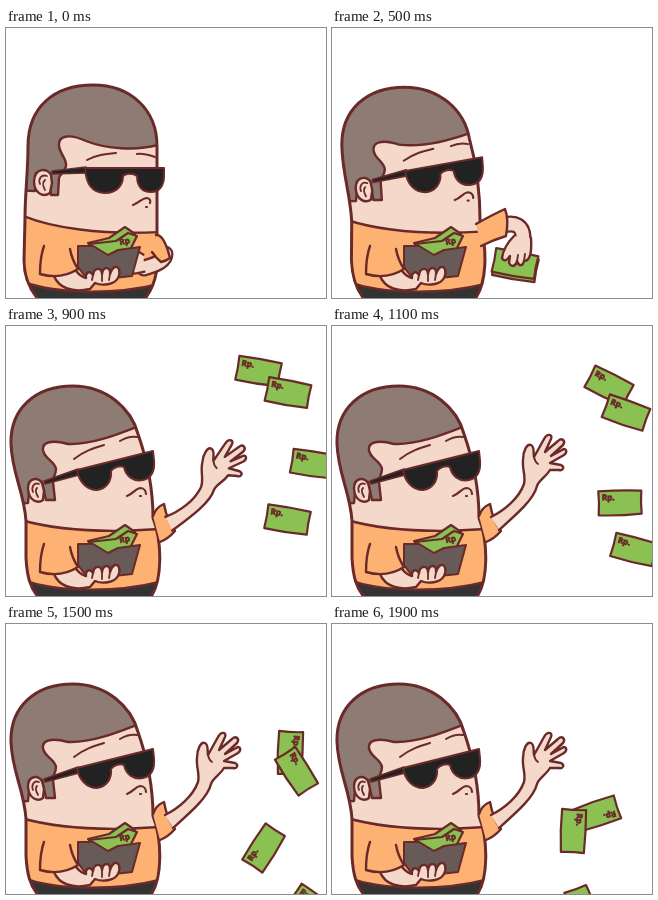
An HTML page for the animation above (2000 ms loop, 320 by 270 pixels).

```html
<!DOCTYPE html>
<html lang="en">
<head>
<meta charset="utf-8">
<title>Throwing banknotes</title>
<style>
  html, body { margin: 0; width: 100%; height: 100%; overflow: hidden; background: #fff; }
  svg { display: block; width: 100%; height: 100%; }
  path { stroke-linecap: round; stroke-linejoin: round; }
  text { font: bold 8px "Noto Sans", sans-serif; fill: #6b2a2a; stroke: #6b2a2a; stroke-width: .8; }
</style>
</head>
<body>
<svg id="stage" viewBox="0 0 320 270"></svg>
<script>
const LOOP = 2000, STEP = 100, LEAN_TIME = 700, RELEASE = 700;
const INK = '#6b2a2a', SKIN = '#f4d8ca', HAIR = '#8d7b74', SHIRT = '#fdb172';
const GREEN = '#8bc153', LEATHER = '#685a56', BLACK = '#222', PANTS = '#333';

const stage = document.getElementById('stage');

function el(tag, attrs, parent = stage) {
  const node = document.createElementNS('http://www.w3.org/2000/svg', tag);
  for (const k in attrs) node.setAttribute(k, attrs[k]);
  parent.appendChild(node);
  return node;
}
const group = (parent = stage, attrs = {}) => el('g', attrs, parent);
const shape = (parent, d, fill = 'none', width = 2.4, stroke = INK) =>
  el('path', { d, fill, stroke, 'stroke-width': width }, parent);

// Blends every number in two strings of the same structure.
const NUM = /-?\d+(?:\.\d+)?/g;
function blend(a, b, p) {
  const to = b.match(NUM);
  let i = 0;
  return a.replace(NUM, n => (+n + (to[i++] - n) * p).toFixed(2));
}

// Linear track of [time, string] keys.
function track(keys, t) {
  if (t <= keys[0][0]) return keys[0][1];
  const i = keys.findIndex(k => k[0] >= t);
  if (i < 0) return keys[keys.length - 1][1];
  const [t0, a] = keys[i - 1], [t1, b] = keys[i];
  return blend(a, b, (t - t0) / (t1 - t0));
}

// Smooth track of [time, ...values] keys.
function spline(keys, t) {
  let i = 0;
  while (i < keys.length - 2 && keys[i + 1][0] < t) i++;
  const a = keys[i], b = keys[i + 1], h = b[0] - a[0], u = (t - a[0]) / h;
  const slope = (j, c) => {
    const l = keys[Math.max(j - 1, 0)], r = keys[Math.min(j + 1, keys.length - 1)];
    return (r[c] - l[c]) / (r[0] - l[0]) * h;
  };
  return [1, 2, 3].map(c =>
    (1 + 2 * u) * (1 - u) ** 2 * a[c] + u * (1 - u) ** 2 * slope(i, c) +
    u * u * (3 - 2 * u) * b[c] + u * u * (u - 1) * slope(i + 1, c));
}

const place = (node, x, y, r) => node.setAttribute('transform', `translate(${x} ${y}) rotate(${r})`);

// Parts that follow the lean: upright path and leaning path.
const leaning = [];
function lean(node, upright, back) {
  leaning.push([node, upright, back]);
  return node;
}
const leanShape = (parent, upright, back, ...style) =>
  lean(shape(parent, upright, ...style), upright, back);

const BODY = [
  'M33 272C24 262 18 250 18 232L19 190C19 165 22 145 22 118C22 80 47 57 87 57C125 57 151 82 151 118C151 130 151 165 151 205C153 235 152 255 138 272',
  'M33 272C24 262 21 250 20 232L20 195C18 165 6 148 5 118C4 83 29 60 67 60C100 60 125 82 132 108C139 128 147 155 147 192C156 215 157 255 144 272'
];

function drawBody() {
  const clip = el('clipPath', { id: 'body' }, el('defs', {}));
  lean(el('path', {}, clip), ...BODY);
  leanShape(stage, ...BODY, SKIN, 0, 'none');
  const inner = group(stage, { 'clip-path': 'url(#body)' });
  leanShape(inner,
    'M0 162L0 40L170 40L152 117C130 123 100 121 80 113C62 105 52 108 53 118C54 126 61 131 60 138C59 144 54 146 53 150L52 167L45 167L43 145L30 145L29 163Z',
    'M0 178L0 40L170 40L133 100C110 109 85 119 62 118C44 113 36 117 37 124C38 133 49 135 50 143C50 149 46 152 47 156L49 174L40 174L36 156L24 156L22 177Z', HAIR);
  leanShape(inner, 'M15 187C45 200 95 207 155 204L175 275L5 275Z',
    'M15 194C50 204 100 207 155 203L175 275L5 275Z', SHIRT);
  shape(inner, 'M15 253C50 267 115 267 160 254L165 280L10 280Z', PANTS);
  leanShape(stage, ...BODY, 'none', 3);
}

function drawFace() {
  leanShape(stage, 'M45 147C42 140 29 139 28 153C28 165 37 170 44 165L46 155Z',
    'M36 157C32 151 22 151 22 163C23 175 32 178 37 174L38 165Z', SKIN);
  leanShape(stage, 'M41 148C35 146 32 151 34 156M39 152C35 156 38 159 39 162',
    'M33 158C28 156 25 161 27 166M31 162C28 165 31 168 32 171', 'none', 1.8);
  leanShape(stage, 'M81 132C90 127 99 126 110 125M131 126C138 125 143 127 149 129',
    'M68 133C78 125 88 122 98 119M114 115C119 112 125 110 131 111', 'none', 2);
  leanShape(stage, 'M46 143L80 139L80 145L46 146Z', 'M38 155L72 143L73 149L39 158Z', BLACK, 1.6);
  leanShape(stage,
    'M79 140L158 140L158 148C158 158 153 164 145 164C136 164 131 158 131 148C127 145 120 145 117 148C117 158 110 165 99 165C87 165 80 157 79 140Z',
    'M71 144L147 125L148 134C149 145 145 152 137 154C127 156 120 150 118 141C114 139 108 141 105 145C106 155 100 163 91 164C81 164 73 156 71 144Z', BLACK, 2);
  leanShape(stage, 'M127 177C133 175 135 171 140 170C144 170 145 173 144 175M140 179L141 179',
    'M121 170C127 168 129 163 134 162C138 162 140 165 140 168M134 170L135 170', 'none', 2.2);
}

function note(parent, label) {
  const g = group(parent);
  shape(g, 'M-21.5 -12Q0 -13 21.5 -12Q20.5 0 21.5 11Q0 13 -21.5 12Q-20.5 0 -21.5 -12Z', GREEN, 2.2);
  el('text', { x: -18, y: -3 }, g).textContent = label;
  return g;
}

// Arm that draws the notes from the wallet.
const SLEEVE = [
  [0, 'M150 207Q158 206 164 230Q160 233 155 234Q150 230 146 224'],
  [200, 'M146 205Q162 201 175 208Q168 218 158 226Q151 224 146 222'],
  [500, 'M144 196Q160 187 173 181Q177 191 174 208Q161 212 149 218'],
  [600, 'M145 193Q155 185 165 181Q167 193 171 207Q163 212 151 217'],
  [700, 'M147 190Q150 181 158 178Q161 195 169 205Q162 213 154 216']
];
const FOREARM = [
  [0, 'M159 226C159 232 152 236 138 240'],
  [200, 'M163 215C160 229 154 238 138 245'],
  [500, 'M166 199C184 192 192 198 191 213'],
  [600, 'M162 195C175 190 185 186 196 182']
];
const HAND = [
  [0, 'translate(136 236) rotate(80)'],
  [200, 'translate(140 243) rotate(65)'],
  [500, 'translate(191 211) rotate(0)'],
  [600, 'translate(196 182) rotate(-80)']
];
const HELD = [
  [0, 'translate(103 234) rotate(-5)'],
  [200, 'translate(135 241) rotate(-22)'],
  [500, 'translate(183 236) rotate(11)'],
  [600, 'translate(203 189) rotate(-50)']
];

drawBody();
drawFace();

const reach = group();
const held = group(reach);
place(note(held, ''), 1, 3, 0);
note(held, '');
const armLine = shape(reach, '', 'none', 17);
const armSkin = shape(reach, '', 'none', 12.5, SKIN);
const hand = group(reach);
shape(hand, 'M-9 -3C-16 4 -20 12 -21 19C-19 24 -15 20 -13 17L-14 24C-11 29 -7 27 -6 22C-4 28 0 27 1 22C7 22 9 14 8 -1', SKIN);
shape(hand, 'M-6 22L-5 16M1 22L2 15', 'none', 1.8);

const sleeve = shape(stage, '', SHIRT);

// Open hand after the throw.
const thrown = group();
shape(thrown, 'M159 191C173 184 187 172 192 158C194 150 190 143 191 134C191 125 195 117 199 119C203 121 201 127 202 131L212 113C215 107 221 108 219 113L213 126L226 115C230 111 234 115 231 119L219 130L230 124C234 121 236 126 232 129L218 137L229 139C233 141 231 145 227 144L218 144C214 151 207 154 205 160C202 173 186 187 167 204', SKIN);
shape(thrown, 'M202 131Q203 136 206 138', 'none', 1.8);

// Wallet and the arm holding it.
shape(stage, 'M82 215L103 210L119 199L129 206L124 222L90 223Z', GREEN, 2.2);
shape(stage, 'M83 216L110 213L122 205L131 208L124 222L102 228Z', GREEN, 2.2);
el('text', { transform: 'translate(114 217) rotate(-12)' }).textContent = 'Rp';
shape(stage, 'M72 218L87 218L102 227L112 222L134 219L126 248Q100 252 78 247L72 239Z', LEATHER, 2);
shape(stage, 'M48 248C53 260 66 265 84 261L89 255C96 258 108 257 112 250C115 244 113 238 109 239C106 240 105 243 104 246C105 238 97 238 96 246C96 239 88 239 87 247C83 241 79 246 80 250Q75 249 70 243', SKIN);
shape(stage, 'M104 246L103 252M96 246L96 253M87 247L86 252', 'none', 1.8);
shape(stage, 'M38 218C34 229 34 239 34 246Q55 252 72 241Q66 232 64 221', SHIRT);

// Flying notes: time, x, y, angle.
const FLIGHTS = [
  [[700, 218, 96, -8], [900, 252.5, 45.5, 10], [1100, 277, 60, 27], [1500, 284, 129, 93], [1900, 265, 189.5, 162]],
  [[700, 229, 112, 2], [900, 282, 67, 11], [1100, 294, 87, 20], [1500, 290.5, 147.5, 58], [1900, 241, 207, 93]],
  [[700, 240, 134, 14], [900, 307, 138, 9], [1100, 288, 177, -1], [1500, 258, 224, -57], [1900, 251, 285, -110]],
  [[700, 230, 158, 5], [900, 281.5, 194, 10], [1100, 302, 224, 15], [1500, 306, 282, 36], [1900, 300, 335, 60]]
];
const flying = group();
const notes = FLIGHTS.map(() => note(flying, 'Rp.'));

const SWING = [[700, '22'], [800, '12'], [900, '5'], [1000, '2'], [1100, '0']];
const show = (node, on) => node.setAttribute('visibility', on ? 'visible' : 'hidden');

function draw(t) {
  const p = Math.min(t / LEAN_TIME, 1);
  for (const [node, a, b] of leaning) node.setAttribute('d', blend(a, b, p));

  sleeve.setAttribute('d', track(SLEEVE, t));
  const released = t >= RELEASE;
  show(reach, !released);
  show(thrown, released);
  show(flying, released);
  if (released) {
    thrown.setAttribute('transform', `rotate(${track(SWING, t)} 160 195)`);
    notes.forEach((n, i) => place(n, ...spline(FLIGHTS[i], t)));
  } else {
    const arm = track(FOREARM, t);
    armLine.setAttribute('d', arm);
    armSkin.setAttribute('d', arm);
    hand.setAttribute('transform', track(HAND, t));
    held.setAttribute('transform', track(HELD, t));
  }
}

const start = performance.now();
function tick() {
  const ms = (performance.now() - start) % LOOP;
  draw(Math.floor(ms / STEP) * STEP);
  requestAnimationFrame(tick);
}
tick();
</script>
</body>
</html>
```
